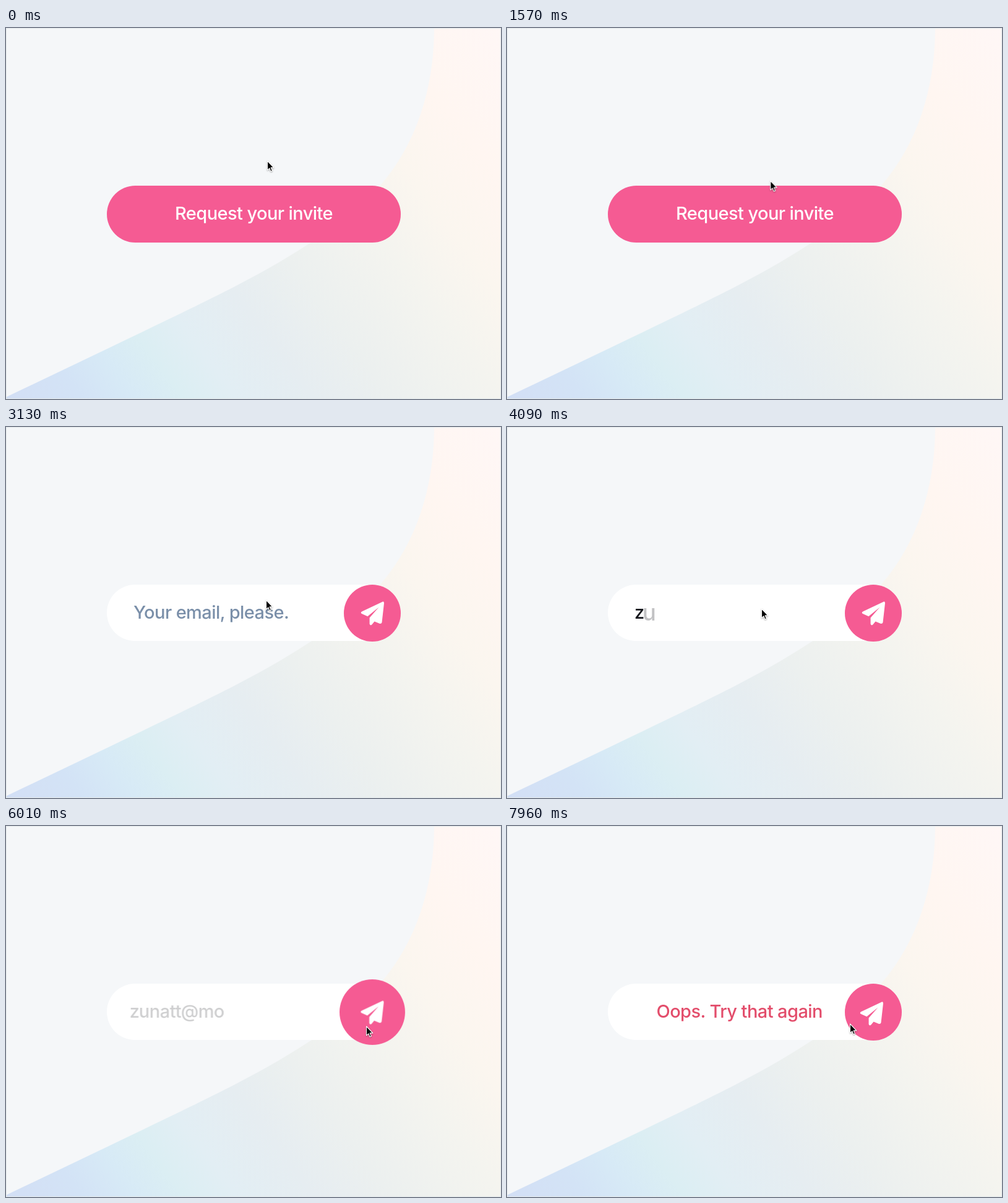
An HTML page that plays this animation: 800x600 px, repeating every 7990 ms.

```html
<!DOCTYPE html>
<html lang="en">
<head>
<meta charset="utf-8">
<title>Invite request</title>
<style>
  html, body { margin: 0; width: 100%; height: 100%; overflow: hidden; background: #f5f7f9; }
  #stage { position: absolute; left: 0; top: 0; width: 800px; height: 600px; overflow: hidden; }
  #stage > * { position: absolute; }
  svg { display: block; overflow: visible; }
  #backdrop { left: 0; top: 0; }
  .pill { top: 254.7px; height: 91.8px; border-radius: 46px; }
  #field { left: 163px; width: 474.5px; background: #fff; }
  #button { right: 162.5px; width: 474.5px; background: #f55b93; transform-origin: calc(100% - 45.9px) 50%; }
  .text {
    top: 254px; white-space: pre;
    font: 500 29px/92px Inter, "Open Sans", sans-serif; letter-spacing: -0.02em;
  }
  .text span { display: inline-block; }
  #label { left: 163px; width: 475px; text-align: center; color: #fff; }
  #hint { left: 206px; color: #7a8fa9; }
  #email { left: 205.5px; color: #14161c; }
  #error { left: 240.5px; color: #e34d6b; }
  #plane { left: 572px; top: 281px; }
  #finger { left: 201px; top: 280px; transform-origin: 15px 34px; }
  #pointer { left: 0; top: 0; filter: drop-shadow(0 1px 1px rgba(0, 0, 0, .35)); }
</style>
</head>
<body>
<div id="stage">
  <svg id="backdrop" width="800" height="600">
    <defs>
      <linearGradient id="dawn" gradientUnits="userSpaceOnUse" x1="0" y1="600" x2="800" y2="0">
        <stop offset="0" stop-color="#d3dff5"/>
        <stop offset=".1" stop-color="#d3e3f6"/>
        <stop offset=".17" stop-color="#d7eaf6"/>
        <stop offset=".23" stop-color="#dbeef3"/>
        <stop offset=".3" stop-color="#e2eef4"/>
        <stop offset=".4" stop-color="#e6edf1"/>
        <stop offset=".5" stop-color="#ecf0ef"/>
        <stop offset=".64" stop-color="#f4f4ef"/>
        <stop offset=".74" stop-color="#fbf6ef"/>
        <stop offset=".85" stop-color="#fff6f1"/>
        <stop offset="1" stop-color="#fff7f6"/>
      </linearGradient>
    </defs>
    <rect width="800" height="600" fill="url(#dawn)"/>
    <path fill="#f5f7f9" d="M692 0C692 110 655 212 580 280C520 335 440 381 383 411C330 440 150 525 0 597V0Z"/>
    <rect x=".5" y=".5" width="799" height="599" fill="none" stroke="#e4eaec"/>
  </svg>

  <div id="field" class="pill"></div>
  <div id="button" class="pill"></div>
  <div id="label" class="text">Request your invite</div>
  <div id="hint" class="text">Your email, please.</div>
  <div id="email" class="text"></div>
  <div id="error" class="text">Oops. Try that again</div>

  <svg id="plane" width="40" height="40">
    <path fill="#fff" d="M36.8 1.4L3 17.4Q.4 19.3 3 21L12.4 25.3L30.5 10.5L15.6 27.6V37.6Q16.6 40.8 19.2 38.8L23.5 33.6L32 37Q35 37.6 35.5 35L39 4Q39 .7 36.8 1.4Z"/>
  </svg>

  <svg id="finger" width="30" height="42" stroke-linecap="round" stroke-linejoin="round">
    <path fill="#fbbd3c" stroke="#dc982a" stroke-width=".8"
      d="M14.5 18L18.4 3.6Q19.6.6 22.6 1.2Q25.5 2 25 5.2L23.4 18Q28.5 21 27.5 29Q27 37 21.5 39.5Q14 42 8 39Q3.8 36.5 2.2 29.5Q.5 23 3.5 20.5Q6 18.6 8.2 20Q10.5 16.6 14.5 18Z"/>
    <path fill="none" stroke="#b87517" stroke-width="1.3"
      d="M8.2 20Q9.8 24 9.4 28M14.4 18.5Q15.2 22 14.2 25.5M4 31Q7 29.5 9.4 28.2Q14 24.5 19 25.5Q22.5 27 19.5 30Q16 31 14.5 35"/>
  </svg>

  <svg id="pointer" width="14" height="20">
    <path fill="#000" stroke="#fff" stroke-width="1.1" stroke-linejoin="round"
      d="M.5 0V14.8L3.8 11.8L6 17L8.4 16L6.2 10.9H10.8Z"/>
  </svg>
</div>

<script>
  const LOOP = 7990;
  const OUT = 'cubic-bezier(.22, .61, .36, 1)';
  const IN_OUT = 'cubic-bezier(.45, 0, .3, 1)';
  const $ = id => document.getElementById(id);

  // Each step is [time, value, easing towards the next step].
  function play(el, property, steps) {
    const all = [[0, steps[0][1]], ...steps, [LOOP, steps.at(-1)[1]]];
    const frames = all.map(([time, value, easing = 'linear']) =>
      ({ offset: time / LOOP, [property]: value, easing }));
    el.animate(frames, { duration: LOOP, iterations: Infinity });
  }
  const fade = (el, ...steps) => play(el, 'opacity', steps);
  const move = (el, ...steps) => play(el, 'transform', steps);
  const at = (x, y) => `translate(${x}px, ${y}px)`;

  // The button rises in, folds into a circle, then reacts to hover and press.
  const button = $('button');
  fade(button, [1000, 1], [1000, 0], [1205, 1]);
  play(button, 'width', [[2340, '474.5px', 'cubic-bezier(.215, .61, .355, 1)'], [2690, '91.8px']]);
  move(button,
    [1000, 'translateY(0px) scale(1)'],
    [1000, 'translateY(16px) scale(1)'], [1208, 'translateY(0px) scale(1)'],
    [5430, 'translateY(0px) scale(1)', OUT], [5760, 'translateY(0px) scale(1.2)'],
    [5890, 'translateY(0px) scale(1.2)', IN_OUT], [6300, 'translateY(0px) scale(1)']);

  fade($('field'), [2340, 0], [2340, 1]);

  const label = $('label');
  fade(label, [1000, 1], [1000, 0], [1220, 0, OUT], [1560, 1], [2340, 1], [2460, 0]);
  move(label, [2340, at(0, 0)], [2490, at(-15, 0)]);

  const hint = $('hint');
  fade(hint, [2500, 0, OUT], [2900, 1], [3720, 1], [3860, 0]);
  move(hint, [2500, at(16, 0), OUT], [3100, at(0, 0)]);

  const plane = $('plane');
  fade(plane, [2560, 0, OUT], [2860, 1]);
  move(plane,
    [2560, at(-14, 10), OUT], [3100, at(0, 0)],
    [5900, at(0, 0), IN_OUT], [6350, at(-3, 2)]);

  // Letters pop in one by one.
  const email = $('email');
  const keyTimes = [3900, 4070, 4230, 4390, 4525, 4570, 4620, 4660, 4700];
  [...'zunatt@mo'].forEach((letter, i) => {
    const span = document.createElement('span');
    span.textContent = letter;
    email.append(span);
    const time = keyTimes[i];
    fade(span, [time, 0], [time + 80, 1]);
    move(span, [time, 'scale(1.7)', OUT], [time + 80, 'scale(1)']);
  });
  fade(email, [5900, 1], [6040, 0]);
  move(email, [5900, at(0, 0)], [6040, at(-8, 0)]);

  const error = $('error');
  fade(error, [6020, 0, OUT], [6320, 1]);
  move(error, [6020, at(14, 0), OUT], [6500, at(0, 0)], [7500, at(0, 0)], [7900, at(1, 0)]);

  const finger = $('finger');
  const tilt = angle => `rotate(${angle}deg)`;
  fade(finger, [6060, 0, OUT], [6300, 1], [7560, 1], [7860, 0]);
  move(finger,
    [6060, tilt(-12), OUT], [6480, tilt(0)], [6640, tilt(0), IN_OUT],
    [6800, tilt(-5), IN_OUT], [6980, tilt(5), IN_OUT],
    [7160, tilt(-5), IN_OUT], [7340, tilt(5), IN_OUT], [7480, tilt(0)]);

  move($('pointer'),
    [1000, at(422, 215)], [1000, at(457, 92)],
    [1160, at(457, 92), IN_OUT], [1790, at(421, 268), OUT], [1940, at(420, 280)],
    [3360, at(420, 280), IN_OUT], [3500, at(411, 294)],
    [5080, at(411, 294), IN_OUT], [5800, at(582, 324)],
    [7560, at(582, 324), IN_OUT], [7960, at(554, 320)]);
</script>
</body>
</html>
```
